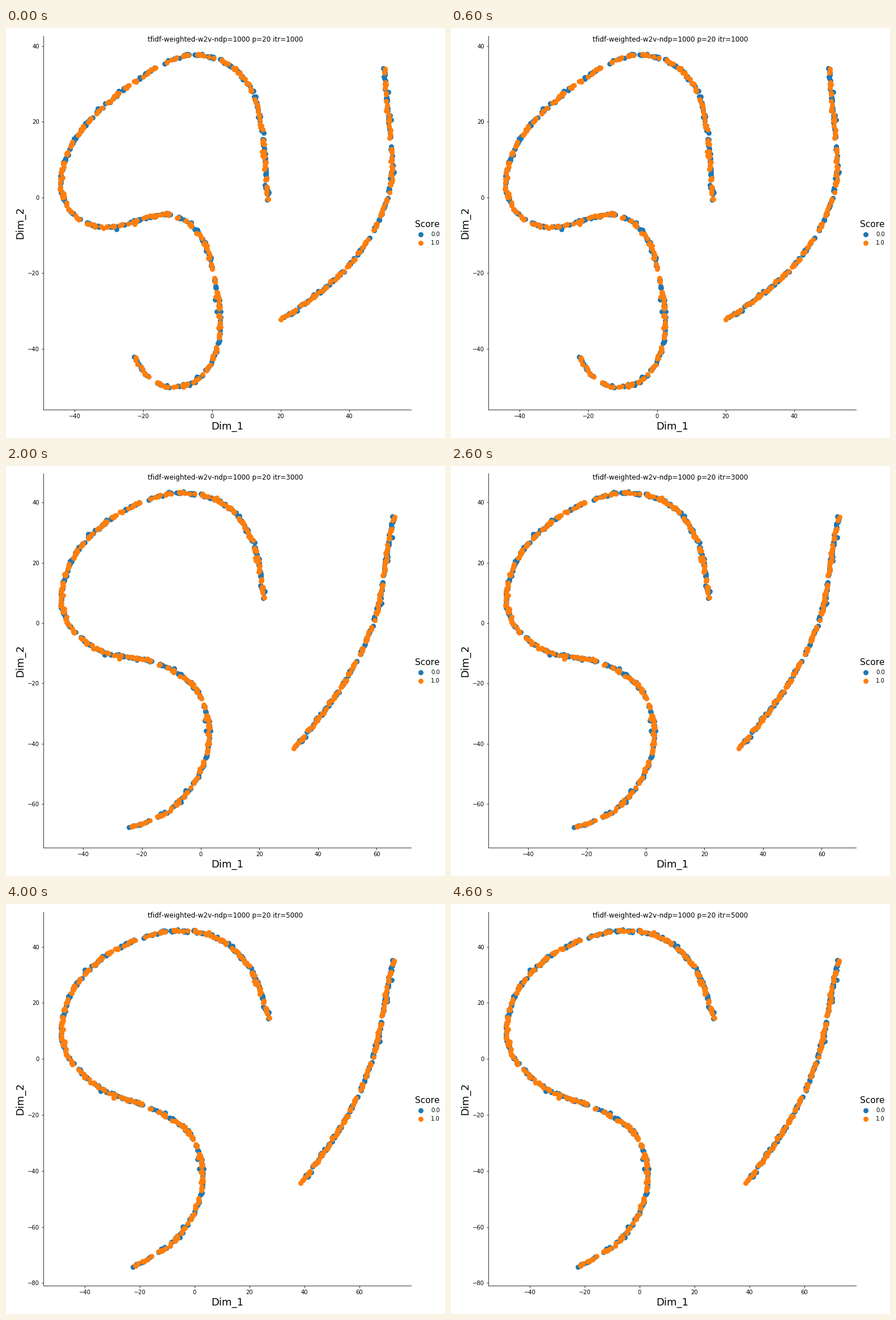
These frames come from a looping animation (775 by 723 pixels, 5000 ms). A matplotlib script:

```python
import numpy as np
import matplotlib.pyplot as plt
from matplotlib.animation import FuncAnimation
from matplotlib.ticker import MultipleLocator

W, H, DPI = 775, 723, 72
LEFT, RIGHT, TOP, BOTTOM = 66, 715, 13.5, 673
BLUE, ORANGE = "#1f77b4", "#ff7f0e"
plt.rcParams["font.family"] = "DejaVu Sans"
plt.rcParams["text.kerning_factor"] = 6

# Stage position of the data origin and pixels per unit, for each step.
VIEWS = [((363.7, 298.8), (6.062, -6.675)),
         ((345.7, 279.3), (5.335, -5.688)),
         ((343.5, 277.0), (5.183, -5.317)),
         ((336.0, 276.2), (4.975, -5.083)),
         ((333.0, 273.2), (4.850, -4.941))]

# Key points of both strands: at first, after the big jump, and settled.
RIBBON_START = [
    (462, 303), (453, 190), (420, 89), (341, 47), (223, 98), (127, 188),
    (100, 245), (102, 303), (136, 341), (180, 351), (297, 331), (340, 362),
    (366, 434), (377, 538), (325, 627), (257, 620), (227, 580)]
RIBBON_JUMP = [
    (449, 254), (441, 155), (396, 74), (316, 47), (205, 86), (121, 165),
    (100, 217), (102, 268), (129, 306), (165, 327), (275, 340), (322, 364),
    (357, 414), (363, 500), (311, 591), (257, 626), (214, 636)]
RIBBON_END = [
    (464, 202), (432, 116), (372, 60), (298, 47), (191, 82), (115, 157),
    (99, 206), (102, 252), (123, 287), (156, 317), (248, 357), (297, 382),
    (333, 420), (346, 498), (306, 584), (261, 619), (225, 640)]
ARC_START = [(667, 73), (679, 201), (680, 265), (651, 352), (607, 416),
             (486, 514)]
ARC_JUMP = [(684, 84), (667, 197), (658, 252), (626, 330), (592, 388),
            (500, 502)]
ARC_END = [(683, 101), (663, 202), (653, 250), (627, 324), (598, 381),
           (521, 492)]

rng = np.random.default_rng(20)


def spline(t, pts, u):
    """Natural cubic spline through pts at knots t, evaluated at u."""
    n, h = len(t), np.diff(t)
    slope = np.diff(pts, axis=0) / h[:, None]
    a, rhs = np.eye(n), np.zeros((n, 2))
    for i in range(1, n - 1):
        a[i, i - 1:i + 2] = h[i - 1], 2 * (h[i - 1] + h[i]), h[i]
        rhs[i] = 6 * (slope[i] - slope[i - 1])
    m = np.linalg.solve(a, rhs)
    k = np.clip(np.searchsorted(t, u) - 1, 0, n - 2)
    p, q, hk = (t[k + 1] - u)[:, None], (u - t[k])[:, None], h[k][:, None]
    return ((m[k] * p**3 + m[k + 1] * q**3) / (6 * hk)
            + (pts[k] / hk - m[k] * hk / 6) * p
            + (pts[k + 1] / hk - m[k + 1] * hk / 6) * q)


class Strand:
    """A curve that carries scattered points of both classes."""

    def __init__(self, start, jump, end, gaps):
        self.keys = [np.array(k, float) for k in (start, jump, end)]
        steps = np.hypot(*np.diff(self.keys[0], axis=0).T)
        self.t = np.append(0, np.cumsum(steps))
        self.gaps = np.interp(gaps, np.arange(len(self.t)), self.t)
        self.groups = [self.scatter(4), self.scatter(4.5)]

    def scatter(self, step):
        """Jittered positions along the curve, with a few wider strays."""
        u = np.arange(0, self.t[-1], step)
        u = np.clip(u + rng.normal(0, 1.2 * step, len(u)), 0, self.t[-1])
        u = u[(abs(u[:, None] - self.gaps) > 5.5).all(axis=1)]
        return u, np.clip(rng.standard_t(4, (len(u), 2)) * 0.9, -6, 6)

    def points(self, step, group):
        start, jump, end = self.keys
        ease = 1 - (1 - max(step - 1, 0) / 3) ** 1.3
        pts = jump + (end - jump) * ease if step else start
        u, offset = self.groups[group]
        return spline(self.t, pts, u) + offset


# Gaps are counted in key points along the strand.
strands = [Strand(RIBBON_START, RIBBON_JUMP, RIBBON_END,
                  [1, 3.55, 4, 4.65, 8, 10, 12, 15]),
           Strand(ARC_START, ARC_JUMP, ARC_END, [1, 3.15])]

fig = plt.figure(figsize=(W / DPI, H / DPI), dpi=DPI, facecolor="white")
ax = fig.add_axes([LEFT / W, 1 - BOTTOM / H,
                   (RIGHT - LEFT) / W, (BOTTOM - TOP) / H])
ax.spines[["top", "right"]].set_visible(False)
ax.xaxis.set_major_locator(MultipleLocator(20))
ax.yaxis.set_major_locator(MultipleLocator(20))
ax.set_xlabel("Dim_1", fontsize=18)
ax.set_ylabel("Dim_2", fontsize=18)
title = fig.suptitle("", fontsize=12)
dots = [ax.scatter([], [], s=56, color=c, linewidths=1.5, label=label)
        for c, label in ((BLUE, "0.0"), (ORANGE, "1.0"))]
fig.legend(handles=dots, title="Score", loc="center right", frameon=False,
           fontsize=10, title_fontsize=15.3, scatterpoints=1)


def draw(step):
    origin, scale = np.array(VIEWS[step])
    ax.set_xlim((np.array([LEFT, RIGHT]) - origin[0]) / scale[0])
    ax.set_ylim((np.array([BOTTOM, TOP]) - origin[1]) / scale[1])
    for group, dot in enumerate(dots):
        px = np.vstack([s.points(step, group) for s in strands])
        dot.set_offsets((px - origin) / scale)
    title.set_text(f"tfidf-weighted-w2v-ndp=1000 p=20 itr={1000 * (step + 1)}")
    return [*dots, title]


anim = FuncAnimation(fig, draw, frames=len(VIEWS), interval=1000,
                     repeat=True, repeat_delay=0)
plt.show()
```
